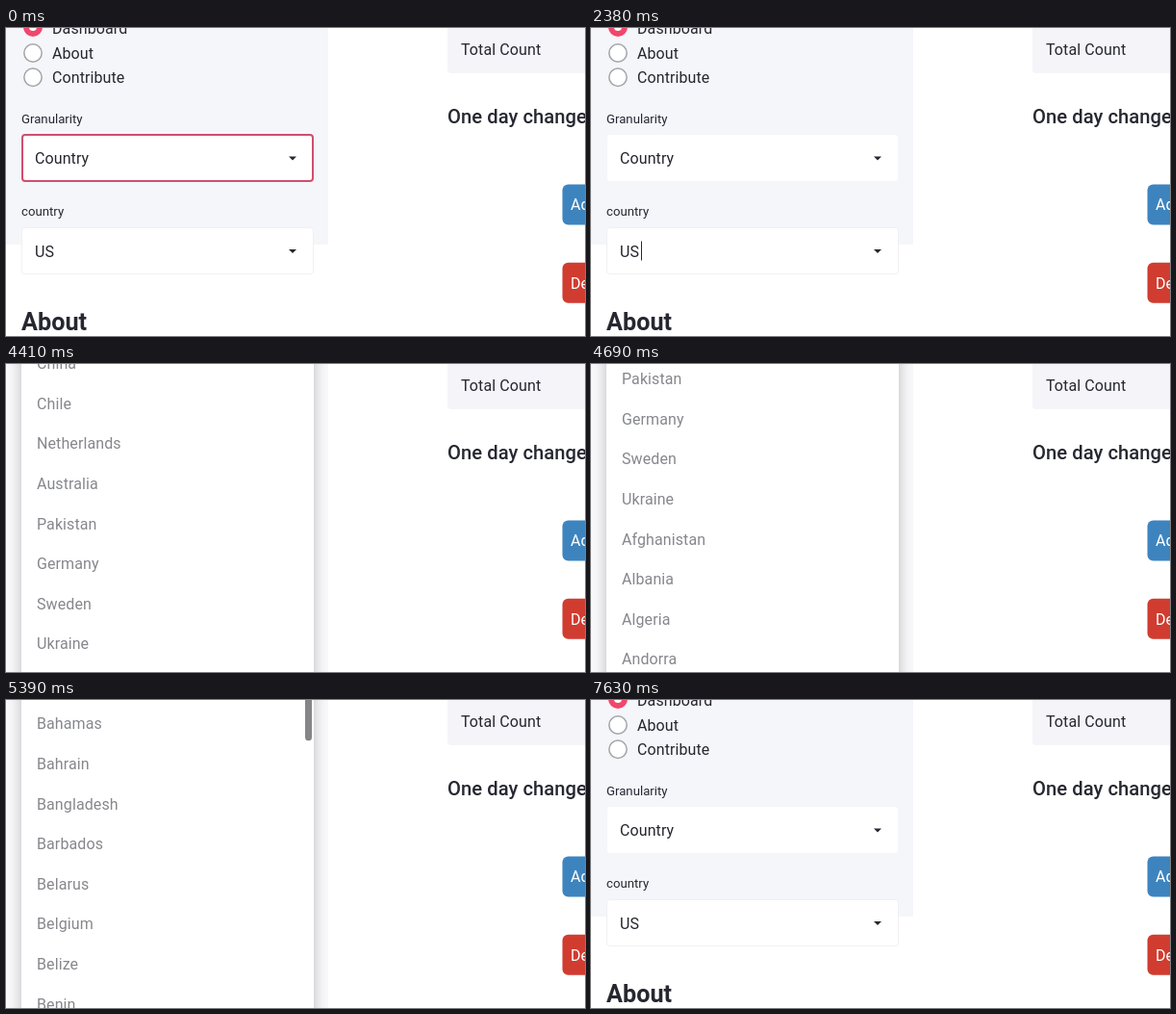
An HTML page that plays this animation: 602x320 px, repeating every 7700 ms.

```html
<!DOCTYPE html>
<html lang="en">
<head>
<meta charset="utf-8">
<style>
  html, body { margin: 0; width: 100%; height: 100%; overflow: hidden; background: #fff; }
  svg { display: block; }
  text { font: 16px Roboto, "Open Sans", sans-serif; letter-spacing: .1px; fill: #262730; }
  .label { font-size: 13.2px; letter-spacing: 0; }
  .radio { fill: #fff; stroke: #a3a4a8; stroke-width: 1.5; }
  .button { fill: #fff; }
  #panel { fill: #fff; filter: drop-shadow(0 0 8px rgba(38, 39, 48, .3)); }
  #rows text { fill: #86878c; }
  #rows .hover { fill: #262730; }
</style>
</head>
<body>
<svg width="602" height="320" viewBox="0 0 602 320">
  <rect width="335" height="225" fill="#f5f6fa"/>

  <circle cx="28" cy="-1" r="10" fill="#f0476d"/>
  <circle cx="28" cy="-1" r="4" fill="#fff"/>
  <circle class="radio" cx="28" cy="26" r="9.2"/>
  <circle class="radio" cx="28" cy="51.3" r="9.2"/>
  <text x="48" y="6">Dashboard</text>
  <text x="48" y="31.7">About</text>
  <text x="48" y="57">Contribute</text>

  <text class="label" x="16" y="98.5">Granularity</text>
  <rect id="granularity" x="17" y="111" width="302" height="48" rx="3" fill="#fff" stroke-width="2"/>
  <text x="30" y="141">Country</text>
  <path d="M294 133.5h8l-4 4z" fill="#262730"/>
  <rect id="caretTop" x="88" y="125" width="1" height="20" fill="#262730"/>

  <text class="label" x="16" y="195">country</text>
  <rect x="16.5" y="207.5" width="303" height="48" rx="3" fill="#fff" stroke="#f0f0f4"/>
  <text x="30" y="237.7">US</text>
  <path d="M294 230h8l-4 4z" fill="#262730"/>
  <rect id="caretBottom" x="52" y="221.5" width="1" height="20" fill="#262730"/>

  <text x="16" y="313.6" style="font-size:25.2px;font-weight:700;letter-spacing:0">About</text>

  <rect x="459" y="-10" width="160" height="57" rx="4" fill="#f4f4f9"/>
  <text x="473" y="28.4">Total Count</text>
  <text x="459" y="98.8" style="font-size:20.2px;font-weight:500;letter-spacing:.05px">One day changes</text>
  <rect x="578.5" y="162.5" width="90" height="42" rx="6" fill="#3d84bf"/>
  <text class="button" x="587" y="189">Added</text>
  <rect x="578.5" y="243.7" width="90" height="42" rx="6" fill="#d03c30"/>
  <text class="button" x="587" y="270.5">Deaths</text>

  <svg id="menu" width="335" height="320">
    <rect width="335" height="320" fill="#fafafc"/>
    <rect id="panel" x="16" y="-60" width="304" height="440"/>
    <g id="rows"></g>
    <rect id="thumb" x="311" width="7" height="100" rx="3.5" fill="#858588"/>
  </svg>
</svg>
<script>
const LOOP = 7700, STEP = 70, ROW = 41.6;
const countries = ("Mexico,Japan,Canada,Colombia,Peru,Spain,India,United Kingdom,China,Chile," +
  "Netherlands,Australia,Pakistan,Germany,Sweden,Ukraine,Afghanistan,Albania,Algeria,Andorra," +
  "Angola,Antigua and Barbuda,Argentina,Armenia,Austria,Azerbaijan,Bahamas,Bahrain,Bangladesh," +
  "Barbados,Belarus,Belgium,Belize,Benin,Bhutan,Bolivia").split(",");

// [time, scroll offset]: two flicks and a short nudge
const scrollKeys = [[3990, 0], [4060, 5.5], [4200, 130], [4410, 341.3], [4620, 475], [4830, 525],
  [4900, 580], [5040, 779.5], [5180, 950], [5390, 1065], [5460, 1065], [5600, 1110], [5740, 1132.2]];
// [from, to, hovered country]
const hovers = [[2380, 3080, "Spain"], [3080, 3220, "Peru"], [3220, 4340, "Colombia"], [5880, 6230, "Belarus"]];

const $ = id => document.getElementById(id);
const within = (t, from, to) => t >= from && t < to;
const clamp = v => Math.max(0, Math.min(1, v));
const show = (id, on) => $(id).setAttribute("visibility", on ? "visible" : "hidden");

const rows = countries.map((name, i) => {
  const row = document.createElementNS("http://www.w3.org/2000/svg", "text");
  row.textContent = name;
  row.setAttribute("x", 32);
  row.setAttribute("y", 13.7 + i * ROW);
  return $("rows").appendChild(row);
});

function scrollAt(t) {
  const i = scrollKeys.findIndex(key => key[0] > t);
  if (i === 0) return 0;
  if (i < 0) return scrollKeys[scrollKeys.length - 1][1];
  const [t0, y0] = scrollKeys[i - 1], [t1, y1] = scrollKeys[i];
  return y0 + (y1 - y0) * (t - t0) / (t1 - t0);
}

function draw(now) {
  const t = Math.floor(now % LOOP / STEP) * STEP;
  const scroll = scrollAt(t);
  const focus = 1 - clamp((t - 1750) / 210);
  const hover = hovers.find(([from, to]) => within(t, from, to));

  $("granularity").setAttribute("stroke", `rgba(208,78,110,${focus})`);
  show("caretTop", within(t, 70, 560) || within(t, 1050, 1610));
  show("caretBottom", within(t, 2310, 6650));

  $("menu").style.opacity = clamp((t - 2380) / 210) * clamp((6860 - t) / 280);
  $("rows").setAttribute("transform", `translate(0 ${-scroll})`);
  $("thumb").setAttribute("y", 9 + (scroll - 779.5) * .1163 - 100);
  rows.forEach((row, i) => row.classList.toggle("hover", !!hover && hover[2] === countries[i]));

  requestAnimationFrame(draw);
}
draw(performance.now());
</script>
</body>
</html>
```
